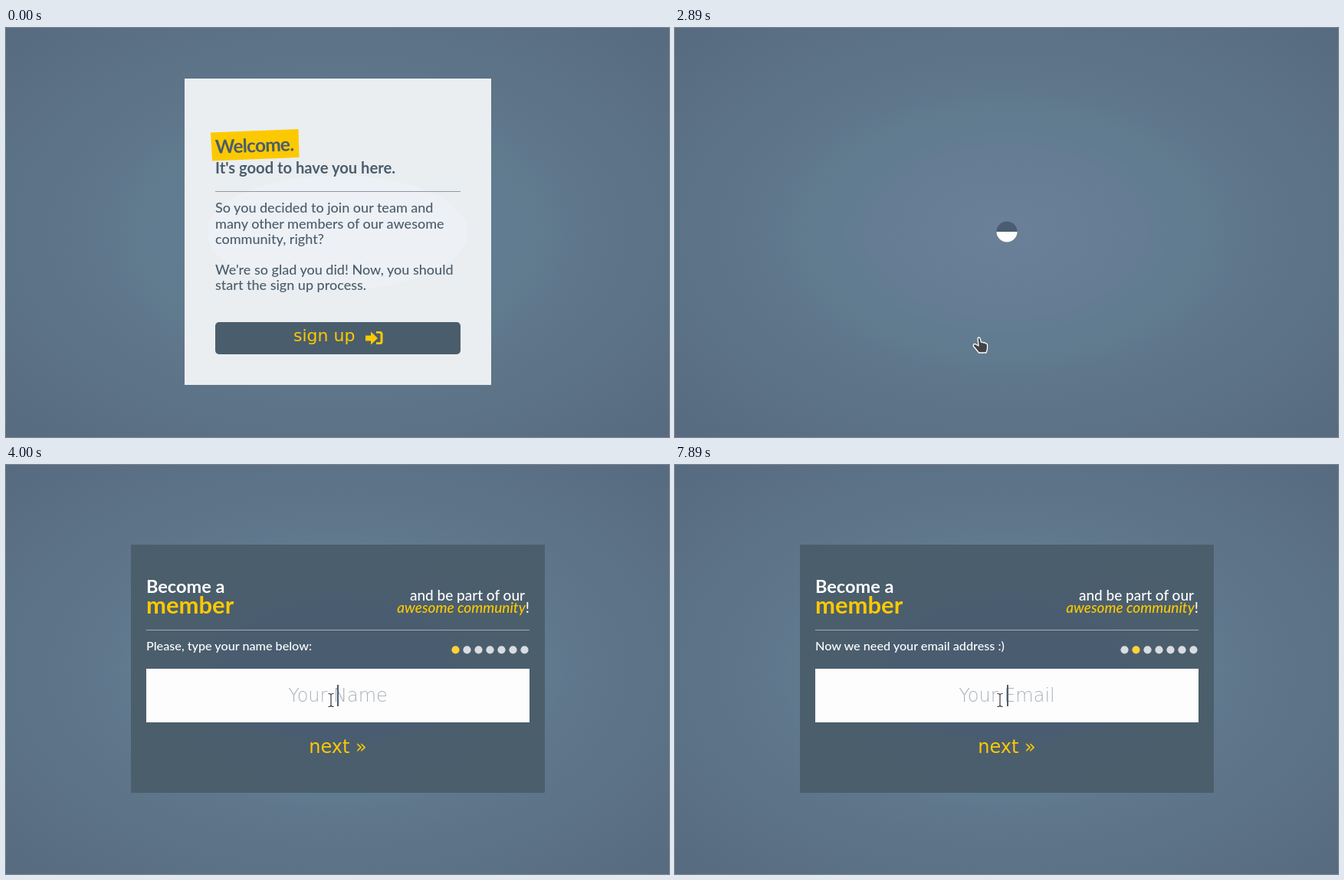
An HTML page that plays this animation: 865x534 px, repeating every 8 s.

```html
<!DOCTYPE html>
<html lang="en">
<head>
<meta charset="utf-8">
<title>Sign up</title>
<style>
  html, body { margin: 0; width: 100%; height: 100%; overflow: hidden; background: #5c7288; }
  svg { display: block; width: 865px; height: 534px; font-family: Lato, sans-serif; }
  text { white-space: pre; }
  .ui { font-family: "DejaVu Sans", sans-serif; }
  .mid { text-anchor: middle; }
  .end { text-anchor: end; }
  .bold { font-weight: 700; }
  .body { font-size: 18px; font-weight: 500; fill: #4b5d6c; }
  .hint { font-size: 24px; font-weight: 200; fill: #a9b2bc; }
  .dark { fill: #4b5d6c; }
  .gold { fill: #fcc900; }
  .white { fill: #fff; }
  .cursor { fill: #434343; stroke: #fff; stroke-width: 1.3; stroke-linejoin: round; }
</style>
</head>
<body>
<svg viewBox="0 0 865 534">
  <defs>
    <radialGradient id="sky" gradientUnits="userSpaceOnUse" cx="0" cy="0" r="1"
      gradientTransform="translate(432.5 267) scale(611.6 377.6)">
      <stop offset="0" stop-color="#6a8098"/>
      <stop offset=".28" stop-color="#667c94"/>
      <stop offset=".35" stop-color="#617c90"/>
      <stop offset=".44" stop-color="#607a8e"/>
      <stop offset=".52" stop-color="#5f768b"/>
      <stop offset="1" stop-color="#576b80"/>
    </radialGradient>
    <radialGradient id="paper" gradientUnits="userSpaceOnUse" cx="0" cy="0" r="1"
      gradientTransform="translate(432.5 267) scale(171 75)">
      <stop offset=".99" stop-color="#edf0f4"/>
      <stop offset="1" stop-color="#eaeef1"/>
    </radialGradient>
    <radialGradient id="slate" gradientUnits="userSpaceOnUse" cx="0" cy="0" r="1"
      gradientTransform="translate(432.5 267) scale(250 155)">
      <stop offset=".6" stop-color="#4a5d70"/>
      <stop offset=".75" stop-color="#4b5e6d"/>
      <stop offset="1" stop-color="#4b5e6c"/>
    </radialGradient>
    <clipPath id="cardClip"><circle id="cardHole" cx="433" cy="266" r="290"/></clipPath>
    <clipPath id="formClip"><circle id="formHole" cx="433" cy="266" r="0"/></clipPath>
  </defs>

  <rect width="865" height="534" fill="url(#sky)"/>

  <g id="card" clip-path="url(#cardClip)">
    <rect x="233" y="66" width="400" height="400" fill="url(#paper)"/>
    <path class="gold" d="M267 136.5L381.5 132L382.5 169L269 173.5Z"/>
    <text class="dark bold" x="273" y="162" font-size="24.5" letter-spacing="-.8"
      transform="rotate(-2 325 153)">Welcome.</text>
    <text class="dark bold" x="273" y="190" font-size="20.2">It's good to have you here.</text>
    <rect x="273" y="213" width="320" height="1" fill="#8d99a5"/>
    <g class="body">
      <text x="273" y="241">So you decided to join our team and</text>
      <text x="273" y="262">many other members of our awesome</text>
      <text x="273" y="282">community, right?</text>
      <text x="273" y="322">We're so glad you did! Now, you should</text>
      <text x="273" y="342">start the sign up process.</text>
    </g>
    <rect id="signBg" x="273" y="384" width="320" height="42" rx="5"/>
    <rect id="focus" x="272.5" y="383.5" width="321" height="43" fill="none" stroke="#3c4650" stroke-dasharray="1 1"/>
    <g id="signInk">
      <text class="ui" x="375" y="409" font-size="22">sign up</text>
      <path d="M469 401.5H476V396.5L485 405L476 413.5V408.5H469Z"/>
      <path d="M483 396H488Q491.500 396 491.500 399.500V409.500Q491.500 413 488 413H483V410.300H487.500Q488.500 410.300 488.500 409V400Q488.500 398.700 487.500 398.700H483Z"/>
    </g>
  </g>

  <g id="form" clip-path="url(#formClip)">
    <rect x="163" y="104" width="540" height="324" fill="url(#slate)"/>
    <text class="white bold" x="183" y="167" font-size="23.5">Become a</text>
    <text class="gold bold" x="183" y="194" font-size="31">member</text>
    <text class="white end" x="677" y="177" font-size="19" font-weight="500">and be part of our</text>
    <text class="white end" x="683" y="193" font-size="19" font-weight="500"><tspan class="gold" font-style="italic">awesome community</tspan>!</text>
    <rect x="183" y="215" width="500" height="1" fill="#a3adb6"/>
    <g id="dots"></g>
    <g id="field">
      <text id="label" class="white" x="183" y="242" font-size="16.200" font-weight="500"></text>
      <rect x="183" y="266" width="500" height="70" fill="#fdfdfd"/>
      <text id="hint" class="ui mid hint" x="433" y="309"></text>
      <text id="typed" class="ui mid dark" x="433" y="309" font-size="24"></text>
      <rect id="caret" class="dark" y="287" width="2" height="28"/>
    </g>
    <path id="nextBg" class="gold" d="M183 338H668L683 373L668 408H183L199 373Z"/>
    <text id="next" class="ui mid" x="433" y="376" font-size="24">next »</text>
  </g>

  <g id="arrow" class="cursor"><path d="M0 0V16L4 12.500L6.500 18.500L9.500 17.200L7 11.500H12Z"/></g>
  <g id="hand" class="cursor">
    <path d="M-2 1Q-1 -.8 .8 .6L2.600 6.500Q4 5.500 5.500 7Q7.500 6.200 8.500 8Q10.500 7.800 10.500 10V15L9 20H-.5L-7.500 11.500Q-8.500 8.500 -5.500 8.500L-1 11Z"/>
  </g>
  <g id="beam" fill="none" stroke-linecap="square">
    <path d="M-3 -8.500Q0 -8.500 0 -6.500Q0 -8.500 3 -8.500M0 -6.500V6.500M-3 8.500Q0 8.500 0 6.500Q0 8.500 3 8.500" stroke="#fff" stroke-width="3.200"/>
    <path d="M-3 -8.500Q0 -8.500 0 -6.500Q0 -8.500 3 -8.500M0 -6.500V6.500M-3 8.500Q0 8.500 0 6.500Q0 8.500 3 8.500" stroke="#3a3a3a" stroke-width="1.200"/>
  </g>
</svg>
<script>
const LOOP = 8000;
const SLATE = [74, 93, 108], GOLD = [252, 201, 0], GREY = [217, 221, 225], SUN = [253, 211, 55];
const KEYS = [
  [4890, 'M'], [5060, 'My'], [5610, 'My '], [5830, 'My N'],
  [6000, 'My Na'], [6110, 'My Nam'], [6220, 'My Name']
];

const $ = id => document.getElementById(id);
const span = (t, a, b) => Math.min(1, Math.max(0, (t - a) / (b - a)));
const lerp = (a, b, p) => a + (b - a) * p;
const out = p => 1 - (1 - p) ** 2;
const inOut = p => p < .5 ? 2 * p * p : 1 - 2 * (1 - p) ** 2;
const mix = (a, b, p) => `rgb(${a.map((v, i) => Math.round(lerp(v, b[i], p)))})`;
const show = (id, on) => $(id).style.display = on ? '' : 'none';
const write = (id, text) => { if ($(id).textContent !== text) $(id).textContent = text; };

const dots = Array.from({ length: 7 }, (_, i) => {
  const dot = document.createElementNS('http://www.w3.org/2000/svg', 'circle');
  dot.setAttribute('cx', 586.5 + 15 * i);
  dot.setAttribute('cy', 241.3);
  dot.setAttribute('r', 5.1);
  dot.style.fill = mix(GREY, GREY, 0);
  $('dots').append(dot);
  return dot;
});

function drawCard(t) {
  show('card', t < 2860);
  $('cardHole').setAttribute('r', 283 * (1 - inOut(span(t, 2260, 2865))));
  const hover = out(span(t, 1680, 2080));
  $('signBg').style.fill = mix(SLATE, GOLD, hover);
  $('signInk').style.fill = mix(GOLD, SLATE, hover);
  show('focus', t >= 2110);
}

function drawForm(t) {
  show('form', t >= 2870);
  $('formHole').setAttribute('r', 330 * span(t, 2870, 3060) ** 1.45);

  const hover = out(span(t, 2880, 3060)) * (1 - out(span(t, 3415, 3825)));
  $('nextBg').style.opacity = hover;
  $('next').style.fill = mix(GOLD, SLATE, hover);

  const second = t >= 7080;
  const step = span(t, 6480, 6900);
  dots[0].style.fill = mix(SUN, GREY, step);
  dots[1].style.fill = mix(GREY, SUN, step);
  $('field').style.opacity = second ? inOut(span(t, 7140, 7560)) : 1 - inOut(span(t, 6470, 7000));
  write('label', second ? 'Now we need your email address :)' : 'Please, type your name below:');

  const key = KEYS.filter(([at]) => t >= at).pop();
  const value = key && !second ? key[1] : '';
  write('typed', value);
  write('hint', value ? '' : second ? 'Your Email' : 'Your Name');
  show('caret', second ? t >= 7890 : t >= 4000);
  const width = value ? $('typed').getComputedTextLength() : 0;
  $('caret').setAttribute('x', Math.round(432 + width / 2 + (second || value ? 1 : 0)));
}

function drawCursor(t) {
  const enter = out(span(t, 1440, 1960));
  const rise = out(span(t, 3310, 3670));
  const moved = t >= 3310;
  const x = moved ? lerp(400, 424, rise ** 2) : lerp(890, 397, enter);
  const y = moved ? lerp(411, 307, rise) : lerp(371, 404, enter) + 12 * Math.sin(Math.PI * enter);
  const kind = t < 1500 ? '' : !moved && x > 593 ? 'arrow' : moved && y < 338 ? 'beam' : 'hand';
  for (const id of ['arrow', 'hand', 'beam']) {
    show(id, id === kind);
    $(id).setAttribute('transform', `translate(${x} ${y})`);
  }
}

function frame() {
  const t = performance.now() % LOOP;
  drawCard(t);
  drawForm(t);
  drawCursor(t);
  requestAnimationFrame(frame);
}
frame();
</script>
</body>
</html>
```
